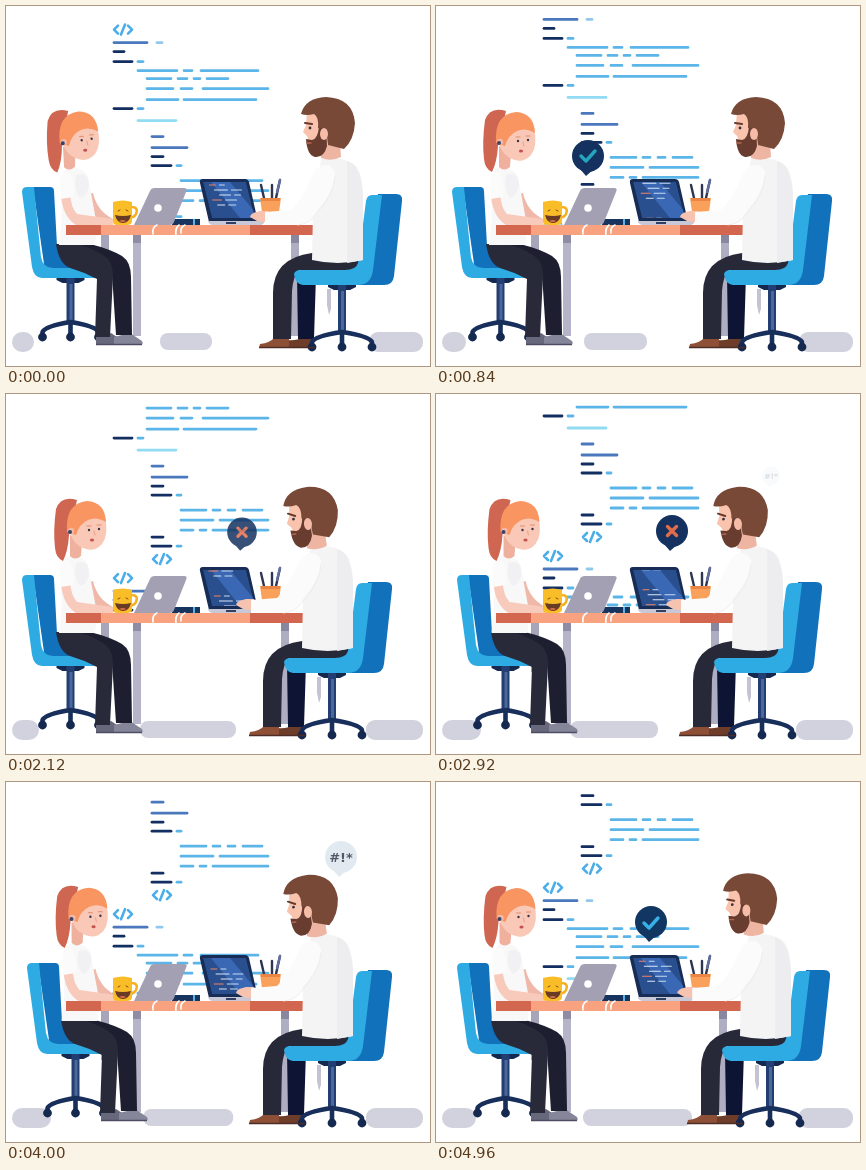
Recreate the animation shown at these times as an HTML page. Size 424 by 360 pixels, loop 5000 ms.

```html
<!DOCTYPE html>
<html lang="en">
<head>
<meta charset="utf-8">
<style>
html, body { margin: 0; width: 100%; height: 100%; overflow: hidden; background: #fff; }
svg { display: block; width: 424px; height: 360px; }
.line { fill: none; stroke-linecap: round; stroke-linejoin: round; }
</style>
</head>
<body>
<svg viewBox="0 0 424 360">
  <defs>
    <clipPath id="page"><rect x="100" y="11.5" width="180" height="207"/></clipPath>
    <clipPath id="screen"><path d="M197 176H240L249 212H206Z"/></clipPath>
  </defs>

  <g fill="#d2d2df">
    <rect id="shadowL" x="6" y="326" height="20" rx="10"/>
    <rect id="shadowM" y="327" height="17" rx="8"/>
    <rect id="shadowR" y="326" height="20" rx="9"/>
  </g>

  <g clip-path="url(#page)"><g id="code"></g></g>

  <path d="M95 228h8v50h-8z" fill="#a6a5ba"/>
  <path d="M127 228h8v102h-8z" fill="#b5b4c8"/>
  <path d="M127 228h8v9h-8z" fill="#8f8da6"/>

  <g id="womanSeat">
    <g id="womanBase"></g>
    <path d="M27 181H44Q48 181 48 185L51 240L90 258V272H40Z" fill="#1271bb"/>
    <path d="M21 181H28Q32 222 35 251Q37 262 47 262H89Q94 263 94 267Q93 272 86 272H36Q28 272 26 261L16 186Q16 181 21 181Z" fill="#2fabe3"/>
    <path d="M90 331Q99 330 105 327L117 335Q119 339 115 339H90Z" fill="#67687c"/>
    <path d="M108 331L124 327L136 335Q138 339 134 339H108Z" fill="#85869a"/>
    <path d="M90 338.5H116M109 338.5H136" stroke="#4c4d62" stroke-width="1.4"/>
    <path d="M60 238H84Q104 243 116 250Q125 256 125 271L126 329H110L106 268Z" fill="#1d1e2f"/>
    <path d="M50 238H72Q94 245 102 253Q107 259 107 270L104 331H89L91 273Q78 266 64 262Q53 258 50 238Z" fill="#282a3a"/>
  </g>

  <g id="womanTorso">
    <path d="M76 190L87 187Q91 205 107 213V219H91Q80 207 76 190Z" fill="#efb8a8"/>
    <path d="M61 162Q77 160 82 171L90 214Q91 231 89 239H53Q57 212 55 188Q54 166 61 162Z" fill="#f8f8f9"/>
    <path d="M70 169Q82 165 83 178Q82 190 74 192Q67 183 70 169Z" fill="#f1f1f3"/>
    <path d="M55 190L64 187Q65 202 71 208L107 213V219H70Q57 211 55 190Z" fill="#f8cabb"/>
    <path d="M54 174Q57 163 64 167Q69 176 67 191L55 193Z" fill="#fbfbfb"/>
  </g>

  <g id="womanHead">
    <path d="M70 105Q54 100 49 114Q46 136 48 153Q49 163 56 166Q61 156 62 140Z" fill="#cf6651"/>
    <path d="M63 140L75 147L74 161Q68 166 63 161Z" fill="#efb09d"/>
    <path d="M65 119Q80 110 98 122Q102 140 95 149Q87 158 76 153Q66 149 63 137Z" fill="#f9c8b6"/>
    <path d="M60 137Q58 108 80 106Q98 107 99 127Q89 121 81 125Q72 129 69 140Z" fill="#f99560"/>
    <circle cx="64" cy="136" r="3.2" fill="#f3b8a6"/>
    <circle cx="63" cy="137" r="2" fill="#35456b"/>
    <g fill="#37344a"><circle cx="82" cy="135" r="1.2"/><circle cx="92" cy="134" r="1.2"/></g>
    <path class="line" d="M80 131h4M90 130h4" stroke="#dd8d70"/>
    <path class="line" d="M87 136l1 4" stroke="#e5a48f"/>
    <ellipse cx="85" cy="145" rx="2.1" ry="1.5" fill="#c6524e"/>
  </g>

  <g id="tableEnd">
    <path d="M285 228h8v102h-8z" fill="#aeadc2"/>
    <path d="M285 228h8v9h-8z" fill="#8987a0"/>
    <path d="M321 283h4v20l-2 6l-2-10z" fill="#c3c3d3"/>
    <path d="M275 219h32v10h-32z" fill="#d2664f"/>
  </g>
  <path d="M60 219h36v10h-36z" fill="#d2664f"/>
  <path d="M95 219h150v10h-150z" fill="#f9a27f"/>
  <path d="M244 219h50v10h-50z" fill="#d2664f"/>

  <path d="M166 213h28v6h-28z" fill="#17345f"/>
  <path d="M187 213h2v6h-2z" fill="#5ab4e8"/>
  <path d="M149 182H178Q182 182 180 186L168 216Q167 219 163 219H128L144 185Q145 182 149 182Z" fill="#a4a0b3"/>
  <circle cx="152" cy="202" r="3.8" fill="#fff"/>
  <path class="line" d="M151 219q-5 2-4 9M173 219q-4 3-3 10M179 219q-5 2-4 8" stroke="#fff" stroke-width="1.6"/>

  <path class="line" d="M125 201q8 0 5 7q-2 4-6 3" stroke="#f3b021" stroke-width="2.5"/>
  <path d="M107 196Q117 193 126 196V216Q125 219 121 219H111Q107 219 107 215Z" fill="#f9bd27"/>
  <path d="M109 209Q117 211 125 209Q123 217 117 217Q111 217 109 209Z" fill="#683b25"/>
  <path d="M113 215q4-2 7 0q-3 2-7 0z" fill="#df6c4f"/>
  <path class="line" d="M112 205l2-1M120 204l2 1" stroke="#7d4d20"/>

  <path d="M197 173H239Q242 173 243 176L252 216H203L194 177Q193 173 197 173Z" fill="#182d55"/>
  <g clip-path="url(#screen)">
    <path d="M197 176H240L249 212H206Z" fill="#294f8e"/>
    <path d="M205 176H224L249 206V212H234Z" fill="#3b68b5"/>
    <g id="screenLines" class="line" stroke-width="1"></g>
  </g>
  <path d="M202 215H258V217Q257 219 254 219H207Q203 219 202 215Z" fill="#c8c8d7"/>
  <path d="M220 216h10v2h-10z" fill="#303f62"/>

  <path class="line" d="M255 179l3 13M266 179v13M274 174l-4 18" stroke="#2d3550" stroke-width="2.4"/>
  <path class="line" d="M274 174l-3 12" stroke="#62709f" stroke-width="2.4"/>
  <path d="M254 192H275L273 206H256Z" fill="#f9a15b"/>
  <path d="M255 192h19v3h-19z" fill="#ea8545"/>

  <g id="man">
    <path d="M282 334Q291 335 296 331H308V342H281Q280 338 282 334Z" fill="#6e3d29"/>
    <path d="M291 268H310L308 333H292Z" fill="#0e1433"/>
    <g id="manBase"></g>
    <path d="M254 338Q264 337 269 331H283V342H253Z" fill="#8d5037"/>
    <path d="M253 341.5h30M282 341.5h27" stroke="#4d2c27" stroke-width="1.6"/>
    <path d="M306 247H357V264H293Q287 270 286 285L285 333H267V287Q267 252 306 247Z" fill="#272939"/>
    <path d="M372 188H390Q397 188 396 195L388 270Q387 279 378 279H350Z" fill="#1271bb"/>
    <path d="M366 189H376L367 264Q365 279 352 279H297Q289 278 288 268Q289 264 295 264H339Q350 264 352 257L360 195Q361 189 366 189Z" fill="#2fabe3"/>
    <path d="M315 153Q337 149 350 160Q358 170 357 200V254Q332 260 306 254L307 205Z" fill="#f4f4f5"/>
    <path d="M341 155Q358 160 357 200V254L341 257Z" fill="#ededf0"/>
    <g id="manArm">
      <path d="M262 205L254 205Q244 207 244 211L251 215L264 217Z" fill="#f6c3b0"/>
      <path d="M309 164Q322 153 329 166Q330 183 311 205Q305 217 290 219H259V206L285 204Q296 194 309 164Z" fill="#fbfbfb"/>
      <path class="line" d="M329 171q-1 17-18 36q-7 11-19 12" stroke="#ededf0"/>
    </g>
    <g id="manHead">
      <path d="M315 134L334 134L335 151Q325 156 315 152Z" fill="#eeb5a2"/>
      <path d="M301 105H322V139H305L301 130L297 126L300 119Z" fill="#f9c3ae"/>
      <path d="M300 133L306 134Q312 133 313 120L320 118L321 140Q318 152 309 151Q301 149 300 133Z" fill="#683d2f"/>
      <path d="M295 108Q299 92 320 91Q347 92 349 117Q348 134 338 143L322 139L320 122H312Q313 111 308 108Q301 110 295 108Z" fill="#794938"/>
      <ellipse cx="318" cy="128" rx="4" ry="6" fill="#f5bca8"/>
      <circle cx="304" cy="122" r="1.4" fill="#35303d"/>
      <path class="line" id="brow" stroke="#66392b" stroke-width="2"/>
      <path class="line" d="M301 137h4" stroke="#bb6653" stroke-width="1.4"/>
    </g>
  </g>
  <g id="bubbles"></g>
</svg>

<script>
const LOOP = 5000;
const TIMES = [0, 840, 2120, 2920, 3560, 4400, 4960, LOOP];
const $ = id => document.getElementById(id);
const clamp = v => Math.max(0, Math.min(1, v));
const smooth = v => { v = clamp(v); return v * v * (3 - 2 * v); };
const ramp = (t, a, b) => smooth((t - a) / (b - a));
const move = (id, x, y = 0, extra = "") => $(id).setAttribute("transform", `translate(${x} ${y}) ${extra}`);

function pose(t, values) {
  let i = 0;
  while (i < values.length - 2 && t >= TIMES[i + 1]) i++;
  const k = ramp(t, TIMES[i], TIMES[i + 1]);
  return values[i] + (values[i + 1] - values[i]) * k;
}

// Scrolling code: y, colour, then start/end pairs
const navy = "#132e60", blue = "#4b78bc", sky = "#5bb5e8", pale = "#91dcf3";
const rows = [
  [36, blue, 107, 142], [36, "#91c9ed", 150, 157], [45, navy, 107, 119],
  [55, navy, 107, 127], [55, sky, 131, 138],
  [64, sky, 131, 172, 177, 187, 194, 253],
  [72, sky, 140, 166, 171, 182, 187, 195, 200, 223],
  [82, sky, 140, 168, 174, 187, 196, 263],
  [93, sky, 140, 173, 177, 251],
  [102, navy, 107, 127], [102, sky, 131, 138], [114, pale, 131, 171],
  [130, blue, 145, 158], [141, blue, 145, 182], [150, navy, 145, 158],
  [159, navy, 145, 166], [159, sky, 170, 176],
  [174, sky, 174, 201, 206, 215, 221, 230, 236, 257],
  [184, sky, 174, 208, 213, 263],
  [194, sky, 174, 188, 193, 201, 206, 263],
  [201, navy, 145, 158], [210, navy, 145, 166], [210, sky, 170, 176]
];
const tag = (x, y) => `<path class="line" transform="translate(${x} ${y})" d="M-5-4L-9 0L-5 4M5-4L9 0L5 4M2-5L-2 5" stroke="#4baee8" stroke-width="2.6"/>`;
const block = tag(117, 23) + tag(156, 223) + rows.map(([y, color, ...xs]) => {
  let d = "";
  for (let i = 0; i < xs.length; i += 2) d += `M${xs[i] + 1} ${y}H${xs[i + 1] - 1}`;
  return `<path class="line" d="${d}" stroke="${color}" stroke-width="2.8"/>`;
}).join("");
$("code").innerHTML = block + `<g transform="translate(0 219)">${block}</g>`;

// Small listing on the open laptop, repeating every eight rows
let listing = "";
for (let i = 0; i < 16; i++) {
  const k = i % 8, y = 179 + i * 5, start = 4 + k % 3 * 4, w = 6 + k * 7 % 9;
  if (k > 4) continue;
  listing += `<path d="M${start} ${y}h${w}" stroke="${k % 3 ? "#dbe6f5" : "#ee8467"}"/>
    <path d="M${start + w + 4} ${y}h${5 + k * 5 % 9}" stroke="#c3dbf2"/>`;
}
$("screenLines").innerHTML = listing;

function chairBase(id, x, seat, y, half) {
  $(id).innerHTML = `
    <path d="M${x - 14} ${seat - 4}h28v6l-6 3h-16l-6-3z" fill="#142850"/>
    <path d="M${x - 4} ${seat}h8V${y - 14}h-8z" fill="#233e73"/>
    <path d="M${x - 1} ${seat + 6}h3V${y - 17}h-3z" fill="#4c689b"/>
    <path class="line" d="M${x - half} ${y - 5}Q${x - half + 3} ${y - 11} ${x} ${y - 15}Q${x + half - 3} ${y - 11} ${x + half} ${y - 5}M${x} ${y - 15}V${y - 3}" stroke="#182f5c" stroke-width="4.6"/>`
    + [-half, 0, half].map(dx => `<circle cx="${x + dx}" cy="${y}" r="4.4" fill="#142850"/>`).join("");
}
chairBase("womanBase", 64.5, 272, 331, 28);
chairBase("manBase", 336, 279, 341, 30);

// Speech bubbles: position, fade-in and fade-out times, colours, symbol
const stroked = (d, color) => `<path class="line" d="${d}" stroke="${color}" stroke-width="3.4"/>`;
const bubbles = [
  { x: 152, y: 150, from: 440, to: 1380, fill: "#14315f", mark: stroked("M-7 0L-2 5L7-5", "#25a5bd") },
  { x: 236, y: 137, from: 1940, to: 3200, fill: "#14315f", mark: stroked("M-4.5-4.5L4.5 4.5M4.5-4.5L-4.5 4.5", "#e16c4c") },
  { x: 335, y: 75, from: 2860, to: 3940, fill: "#dae4ed",
    mark: '<text y="5" text-anchor="middle" font-family="DejaVu Sans, sans-serif" font-size="13" font-weight="bold" fill="#20273a">#!*</text>' },
  { x: 215, y: 140, from: 4520, to: LOOP, fill: "#123662", mark: stroked("M-7 1L-2 6L7-4", "#38afe8") }
];
$("bubbles").innerHTML = bubbles.map((b, i) =>
  `<g id="bubble${i}"><circle r="16" fill="${b.fill}"/><path d="M-8 13L-2 20L6 13Z" fill="${b.fill}"/>${b.mark}</g>`).join("");

function draw(now) {
  const t = now % LOOP;
  move("code", 0, 0.6 - t * 0.0276);
  move("screenLines", 199 - t * 0.0018, -t * 0.008, "translate(-39 0) skewX(12.4)");

  const seat = 5 * ramp(t, 2280, 2800);
  move("womanSeat", seat);
  move("womanTorso", seat * 0.5);
  move("womanHead", pose(t, [-5, 0, 1, 4.5, 4, 1.5, 0.5, 0]), pose(t, [0, 0, 1, 1, 1, -1, 0, 0]),
    `rotate(${pose(t, [-3, 0, 0, 0, 0, -1, 0, 0])} 68 160)`);

  const lean = ramp(t, 1120, 1800);
  const back = 0.8 * ramp(t, 4480, 4960);
  const shift = -10 * (lean - back);
  move("man", shift);
  move("tableEnd", shift);
  move("manArm", -4 * (lean - back));
  move("manHead", -4 * lean - 1.5 * back, lean - back, `rotate(${-5 * (lean - back)} 328 152)`);
  $("brow").setAttribute("d", `M299 ${117 - lean + back}l7 ${1 + 2 * (lean - back)}`);

  $("shadowL").setAttribute("width", pose(t, [22, 24, 27, 39, 39, 39, 34, 34]));
  const left = pose(t, [154, 148, 134, 134, 134, 140, 147, 147]);
  $("shadowM").setAttribute("x", left);
  $("shadowM").setAttribute("width", pose(t, [206, 211, 230, 222, 231, 224, 256, 256]) - left);
  $("shadowR").setAttribute("x", 363 + shift * 0.3);
  $("shadowR").setAttribute("width", 54 - shift * 0.3);

  bubbles.forEach((b, i) => {
    const shown = ramp(t, b.from, b.from + 240);
    move("bubble" + i, b.x, b.y + 8 * (1 - shown), `scale(${0.5 + 0.5 * shown})`);
    $("bubble" + i).setAttribute("opacity", shown * (1 - ramp(t, b.to, b.to + 200)));
  });
}

const start = performance.now();
function frame() {
  draw(performance.now() - start);
  requestAnimationFrame(frame);
}
frame();
</script>
</body>
</html>
```
